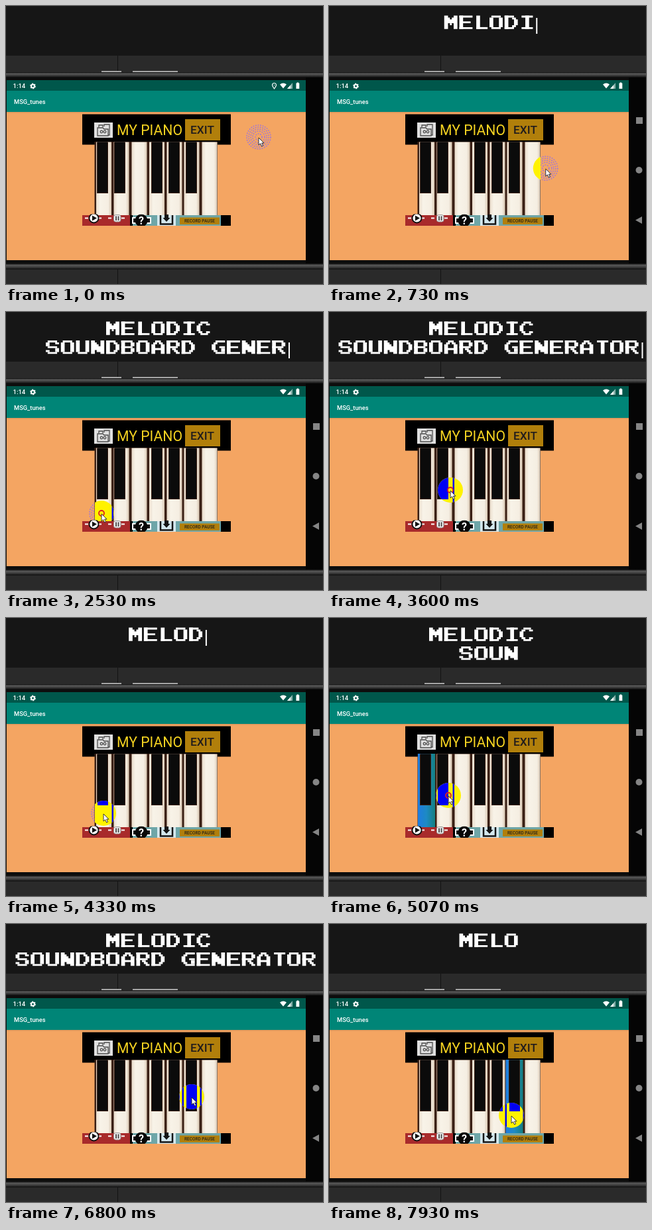
Recreate the animation shown at these times as an HTML page. Size 478 by 420 pixels, loop 8000 ms.

```html
<!DOCTYPE html>
<html lang="en">
<head>
<meta charset="utf-8">
<title>Piano screen</title>
<style>
html, body { margin: 0; width: 100%; height: 100%; overflow: hidden; background: #161616; }
svg { display: block; width: 478px; height: 420px; font-family: Roboto, sans-serif; }
.v { stroke-width: 2; }
.h { stroke-width: 1; }
#caption { stroke: #fff; fill: none; }
#disc { mix-blend-mode: multiply; }
#piano { isolation: isolate; }
</style>
</head>
<body>
<svg viewBox="0 0 478 420">
  <defs>
    <linearGradient id="ivory">
      <stop offset="0" stop-color="#eadccb"/><stop offset=".25" stop-color="#f8f3e8"/>
      <stop offset=".8" stop-color="#f5eee2"/><stop offset="1" stop-color="#d9c7b2"/>
    </linearGradient>
    <linearGradient id="lit">
      <stop offset="0" stop-color="#1f7ce0"/><stop offset=".5" stop-color="#1d8ac4"/>
      <stop offset="1" stop-color="#147f80"/>
    </linearGradient>
    <linearGradient id="rim" x2="0" y2="1">
      <stop offset="0" stop-color="#0c0c0c"/><stop offset=".3" stop-color="#5a5a5a"/>
      <stop offset=".7" stop-color="#333"/><stop offset="1" stop-color="#0c0c0c"/>
    </linearGradient>
    <clipPath id="keyArea"><path d="M134 205h185v111H134z"/></clipPath>
    <clipPath id="darkArea"></clipPath>
    <clipPath id="strip"><path d="M115 314.500h224V332H115z"/></clipPath>
  </defs>

  <path fill="#161616" d="M0 0h478v75H0z"/>
  <path fill="#2a2a2a" d="M0 75h478v345H0z"/>
  <path stroke="#121212" d="M168.500 75v25M168.500 397v23"/>
  <path fill="#a6a6a6" d="M144 98h30v3h-30zM191 98h68v3h-68z"/>
  <path fill="#0d0d0d" d="M0 100h478v297H0z"/>
  <path fill="url(#rim)" d="M0 100h478v8H0z"/>
  <path fill="url(#rim)" d="M0 389h478v9H0z"/>
  <path fill="#050505" d="M452 108h26v281h-26z"/>
  <g id="nav" fill="#858585">
    <path d="M463 168h10v10h-10zM472 318v11l-10-5.500z"/><circle cx="467.500" cy="248" r="5"/>
  </g>

  <path fill="#f4a562" d="M1 160h451v224H1z"/>
  <path fill="#008577" d="M1 128h451v32H1z"/>
  <path fill="#00574b" d="M1 112h451v16H1z"/>
  <path fill="#c98a55" opacity=".5" d="M1 160h451v1.500H1z"/>
  <g fill="#fff">
    <text x="10.500" y="124" font-size="9.500" font-weight="500">1:14</text>
    <text x="12" y="148" font-size="9.300" font-weight="500">MSG_tunes</text>
    <circle cx="40.500" cy="121" r="2.500" fill="none" stroke="#fff" stroke-width="2"/>
    <circle cx="40.500" cy="121" r="3.800" fill="none" stroke="#fff" stroke-width="1.200" stroke-dasharray="2 2"/>
    <path d="M413 118.500q5-4 10 0l-5 6z"/>
    <path d="M432 116v9h-8z" opacity=".55"/><path d="M429 119.500v5.500h-5z"/>
    <path d="M437.500 116.500h1.200v-1h2.400v1h1.200v8.500h-4.800z"/>
  </g>
  <path id="pin" fill="none" stroke="#fff" stroke-width="1.200" d="M404.500 125c-2-3-3-4-3-5.500a3 3 0 0 1 6 0c0 1.500-1 2.500-3 5.500zM404 119.500h1"/>

  <g id="dots" fill="none" stroke="#9d74dc" stroke-width="1.500" stroke-dasharray="1.800 1.800">
    <circle r="18"/><circle r="15"/><circle r="12"/><circle r="9"/><circle r="5"/>
  </g>

  <g id="piano">
    <path fill="#000" d="M115 163.500h224v46H115z"/>
    <rect x="133" y="176" width="28" height="23" fill="#e0e0e0"/>
    <g fill="none" stroke="#4c4c4c" stroke-width="1.300">
      <path d="M140 183v-3h6v3M148 182v-3h8v5M138 184h8l2 2h6v10h-16zM154 195h2v-11"/>
      <circle cx="144" cy="190" r="1.800"/><circle cx="149" cy="190" r="1.800"/>
    </g>
    <text x="167" y="195" font-size="21.200" fill="#f5d321">MY PIANO</text>
    <rect x="270" y="171" width="53" height="32" fill="#b17f0b"/>
    <text x="296" y="193" font-size="17.300" font-weight="500" fill="#211c1c" text-anchor="middle">EXIT</text>

    <path fill="#3a2015" d="M133.500 205h185.500v111H133.500z"/>
    <g id="keys"></g>
    <g clip-path="url(#keyArea)"><circle id="disc" r="19" fill="#fff200"/></g>
    <g clip-path="url(#darkArea)"><circle id="blue" r="19" fill="#0000f5"/></g>

    <g clip-path="url(#strip)">
      <path fill="#a82a2b" d="M115 316h72v16h-72z"/>
      <path fill="#6ea6a8" d="M187 316h137v16H187z"/>
      <path fill="#000" d="M187 316h4v16h-4zM324 316h15v16h-15z"/>
      <path stroke="#fff" stroke-width="2" d="M119 320.500h7M139 320.500h7M154 320.500h7M174 320.500h7" stroke-dasharray="5 2"/>
      <circle cx="132.500" cy="320.500" r="7" fill="#fff" stroke="#111" stroke-width="1.800"/>
      <path fill="#111" d="M130 316.500l7 4-7 4z"/>
      <rect x="162.500" y="315.500" width="10.500" height="10.500" rx="3" fill="#eee" stroke="#999"/>
      <path stroke="#444" stroke-width="1.800" d="M166 317.500v6.500M169.500 317.500v6.500"/>
      <path fill="#fff" d="M190 319h29v10h-29z"/>
      <path fill="#111" d="M192 321h25v6h-25z"/>
      <circle cx="204" cy="324" r="9.500" fill="#080808"/>
      <text x="204" y="329.500" font-size="16" font-weight="700" fill="#fff" text-anchor="middle">?</text>
      <path fill="#d4e8ee" d="M228 316h28v16h-28z"/>
      <path fill="none" stroke="#151515" stroke-width="2.500" d="M233 316v13.500h18V316"/>
      <path fill="#151515" d="M239 315h6v5h2.500l-5.500 6-5.500-6h2.500z"/>
      <path fill="#b17f0b" d="M262 319.500h60v10.500h-60z"/>
      <text x="292" y="326.500" font-size="6.500" font-weight="500" fill="#2a2418" text-anchor="middle">RECORD PAUSE</text>
    </g>
  </g>

  <circle id="click" r="4" fill="none" stroke="#e02020" stroke-width="1.800"/>
  <path id="mouse" fill="#fff" stroke="#222" stroke-width=".9" d="M0 0v11l2.600-2.300 2 4.300 2-1-2-4h3.500z"/>
  <g id="caption" role="img" aria-label="MELODIC SOUNDBOARD GENERATOR"></g>
</svg>
<script>
const LOOP = 8000, PASS = 3700, START = 75, STEP = 100;
const CENTER = 242, CELL = 22.75, ROWS = ["MELODIC ", "SOUNDBOARD GENERATOR"];
const $ = id => document.getElementById(id);

// Pixel letters: thick upright strokes | thin level strokes, on a 7 by 7 grid.
const GLYPHS = {
  A: "M1 2v5M6 2v5M2 1v1M5 1v1|M2 .5h3M1 4.5h5",
  B: "M1 0v7M6 1v2M6 4v2|M0 .5h6M0 3.5h6M0 6.5h6",
  C: "M1 2v3M2 1v1M2 5v1M6 1v1M6 5v1|M2 .5h4M2 6.5h4",
  D: "M1 0v7M5 1v1M6 2v3M5 5v1|M0 .5h5M0 6.5h5",
  E: "M1 0v7|M0 .5h7M1 3.5h5M0 6.5h7",
  G: "M1 2v3M2 1v1M2 5v1M6 4v2|M2 .5h5M4 3.5h3M2 6.5h5",
  I: "M4 0v7|M1 .5h6M1 6.5h6",
  L: "M2 0v7|M1 6.5h6",
  M: "M1 0v7M6 0v7M2 1v3M5 1v3M3 2v2M4 2v2|M3 4.5h1",
  N: "M1 0v7M6 0v7M2 1v3M3 2v3M4 3v3|",
  O: "M1 1v5M6 1v5|M1 .5h5M1 6.5h5",
  R: "M1 0v7M6 1v2M4 4v1M5 5v1M6 6v1|M0 .5h6M0 3.5h6",
  S: "M1 1v2M6 4v2M6 1v1M1 5v1|M1 .5h5M1 3.5h5M1 6.5h5",
  T: "M4 0v7|M1 .5h6",
  U: "M1 0v6M6 0v6|M1 6.5h5"
};

const keyX = [136, 162.5, 189.5, 216, 242.5, 268.5, 295.5];
const blackX = [138, 164, 220, 246, 272];
const box = (x, y, w, h, more = "") => `<rect x="${x}" y="${y}" width="${w}" height="${h}" ${more}/>`;

$("keys").innerHTML =
  keyX.map(x => box(x, 205.5, 23, 110.5, 'fill="url(#ivory)"')).join("") +
  `<g id="pressed">${box(0, 205, 26, 111, 'fill="url(#lit)"')}</g>` +
  blackX.map(x => box(x - 1, 205.5, 17, 77.5, 'fill="#3a2015"') + box(x, 205.5, 15, 76.5, 'fill="#0b0b0b"')).join("");
$("darkArea").innerHTML =
  blackX.map(x => box(x, 205.5, 16, 77.5)).join("") +
  keyX.slice(1).map(x => box(x - 3, 205.5, 2.5, 110.5)).join("");

// Pointer stops: time, x, y
const path = [
  [0, 381, 198], [250, 381, 198], [1250, 266, 298], [1700, 266, 298],
  [2350, 144, 304], [2750, 144, 304], [3400, 183, 269], [3900, 183, 269],
  [4300, 147, 295], [4600, 147, 295], [4950, 180, 268], [5400, 180, 268],
  [6500, 280, 261], [7000, 280, 261], [7700, 275, 289], [8000, 275, 289]
];
const clicks = [[2450, 2620], [3520, 3700], [4980, 5160]];
const presses = [[4850, 5200, 0], [7800, 8000, 5]];
const during = (list, t) => list.find(([from, to]) => t >= from && t < to);

function pointer(t) {
  const i = path.findIndex(p => p[0] > t);
  const [t0, x0, y0] = path[i - 1], [t1, x1, y1] = path[i];
  const k = (t - t0) / (t1 - t0), e = k * k * (3 - 2 * k);
  return [x0 + (x1 - x0) * e, y0 + (y1 - y0) * e];
}

function textRow(text, y) {
  const left = CENTER - text.length * CELL / 2;
  return [...text].map((c, i) => {
    if (c === " ") return "";
    const [v, h] = GLYPHS[c].split("|");
    return `<g transform="translate(${left + i * CELL} ${y}) scale(${CELL / 8} 2.9)"><path class="v" d="${v}"/><path class="h" d="${h}"/></g>`;
  }).join("");
}

function caption(t) {
  if (t < START) return "";
  const local = (t - START) % PASS;
  const n = Math.min(28, Math.floor(local / STEP));
  const first = ROWS[0].slice(0, n), second = ROWS[1].slice(0, Math.max(0, n - 8));
  let out = textRow(first, 14.5) + textRow(second, 43);
  if ((local + 395) % 900 < 450) {
    const x = CENTER + (second || first).length * CELL / 2 + 3;
    out += `<path stroke-width="2" d="M${x} ${second ? 46 : 18}v24"/>`;
  }
  return out;
}

let shown;
function draw(t) {
  const text = caption(t);
  if (text !== shown) $("caption").innerHTML = shown = text;

  const [x, y] = pointer(t);
  for (const id of ["dots", "disc", "blue", "click"])
    $(id).setAttribute("transform", `translate(${x} ${y})`);
  $("mouse").setAttribute("transform", `translate(${x} ${y + 1})`);
  $("click").setAttribute("opacity", during(clicks, t) ? 1 : 0);

  const press = during(presses, t);
  $("pressed").setAttribute("opacity", press ? 1 : 0);
  if (press) $("pressed").setAttribute("transform", `translate(${keyX[press[2]] - 2})`);

  const begun = t >= 70;
  $("nav").setAttribute("opacity", begun ? 1 : 0);
  $("pin").setAttribute("opacity", begun ? 0 : 1);
}

const t0 = performance.now();
function tick() {
  draw((performance.now() - t0) % LOOP);
  requestAnimationFrame(tick);
}
draw(0);
requestAnimationFrame(tick);
</script>
</body>
</html>
```
